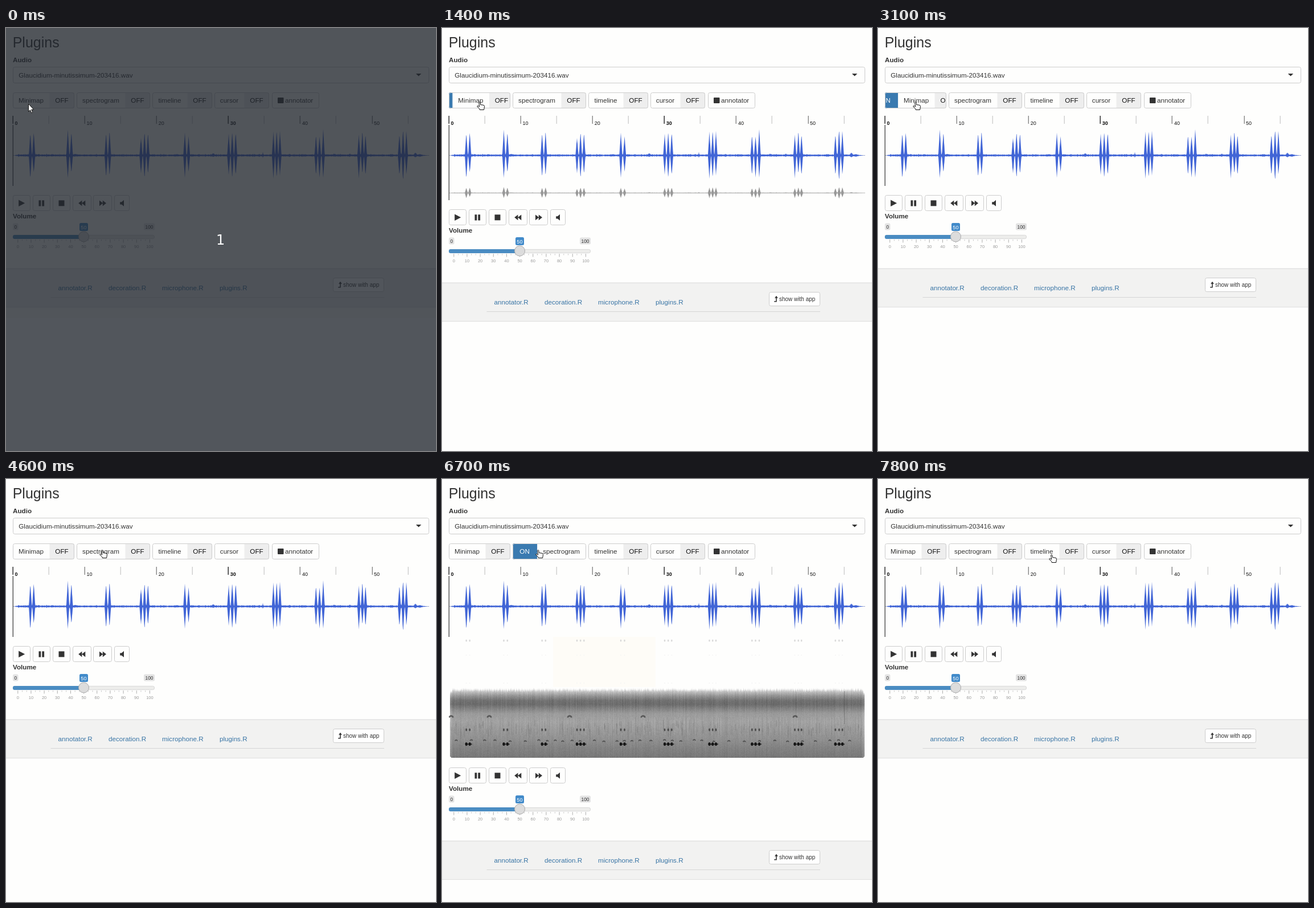
An HTML page with a canvas for the animation above (8 s loop, 755 by 742 pixels).

```html
<!DOCTYPE html>
<html lang="en">
<head>
<meta charset="utf-8">
<title>Plugins</title>
<style>
html, body { margin: 0; width: 100%; height: 100%; overflow: hidden; background: #fefefd; }
svg { position: absolute; left: 0; top: 0; }
canvas { position: absolute; left: 12px; top: 277px; }
text { font-family: "Liberation Sans", Arial, sans-serif; font-size: 11.67px; fill: #333; }
</style>
</head>
<body>
<canvas id="spec" width="731" height="213"></canvas>
<svg id="stage" width="755" height="742" viewBox="0 0 755 742"></svg>
<script>
const NS = 'http://www.w3.org/2000/svg';
const stage = document.getElementById('stage');
const spec = document.getElementById('spec');

function add(parent, tag, attrs, content) {
  const el = document.createElementNS(NS, tag);
  for (const k in attrs) el.setAttribute(k, attrs[k]);
  if (content !== undefined) el.textContent = content;
  parent.appendChild(el);
  return el;
}
const text = (p, x, y, s, style = '', anchor = 'start') =>
  add(p, 'text', { x, y, style, 'text-anchor': anchor }, s);
const rect = (p, x, y, width, height, fill, more) =>
  add(p, 'rect', { x, y, width, height, fill, ...more });
const line = (p, x1, y1, x2, y2, stroke, w = 1) =>
  add(p, 'line', { x1, y1, x2, y2, stroke, 'stroke-width': w });
const path = (p, d, fill, more) => add(p, 'path', { d, fill, ...more });
const box = (p, x, y, w, h, fill = 'none') =>
  rect(p, x + .5, y + .5, w - 1, h - 1, fill, { rx: 3, stroke: '#ccc' });

function seeded(s) {
  return () => {
    s = (s + 0x6d2b79f5) | 0;
    let v = Math.imul(s ^ (s >>> 15), 1 | s);
    v = (v + Math.imul(v ^ (v >>> 7), 61 | v)) ^ v;
    return ((v ^ (v >>> 14)) >>> 0) / 4294967296;
  };
}

// owl calls: x, height above the axis, depth below it
const calls = [
  [42.7, 41, 43], [48.7, 43, 32], [108.5, 47, 41], [114.8, 43, 32],
  [175.7, 41, 40], [181.8, 44, 36], [237, 33, 34], [243.2, 43, 42], [249.3, 40, 33],
  [314, 42, 41], [320.5, 35, 30], [391, 38, 34], [397.2, 44, 42], [403.3, 43, 37],
  [469.5, 42, 41], [475.2, 45, 40], [481, 44, 36], [544.3, 36, 35], [550.5, 35, 41],
  [557, 46, 39], [619.5, 37, 41], [625.7, 43, 32], [631.2, 38, 36],
  [690.7, 38, 36], [697.2, 47, 46], [703, 44, 34]
];
const bumps = [[57, 3], [82, 3], [122, 4], [300, 3], [364, 5], [451, 9], [576, 4], [604, 4], [719, 6]];

function wavePath() {
  const rnd = seeded(11), top = [], bottom = [];
  for (let x = 16; x <= 739; x += .5) {
    const n = 1 + rnd() * .9 + (rnd() > .93 ? 1.2 : 0);
    let up = n, down = n;
    for (const [c, u, d] of calls) {
      const k = Math.max(0, 1 - Math.abs(x - c) / 2.7) * (.9 + rnd() * .1);
      up = Math.max(up, u * k);
      down = Math.max(down, d * k);
      const tail = x - c;
      if (tail > 0 && tail < 9) { up += rnd() * .35; down += rnd() * .35; }
    }
    for (const [c, h] of bumps) {
      const k = Math.max(0, 1 - Math.abs(x - c) / (h > 8 ? 1.2 : 5)) * (.5 + rnd() * .5);
      up = Math.max(up, h * k);
      down = Math.max(down, h * k * .7);
    }
    const fade = Math.min(1, (x - 14) / 8, (740 - x) / 12);
    top.push(`${x} ${(-up * fade).toFixed(2)}`);
    bottom.unshift(`${x} ${(down * fade).toFixed(2)}`);
  }
  return 'M' + top.concat(bottom).join('L') + 'Z';
}

function drawSpectrogram() {
  const g = spec.getContext('2d'), W = 731, H = 213, rnd = seeded(5);
  const tones = [[88, 254], [92, 222], [96, 190], [103, 148], [111, 113], [118, 108], [126, 132],
    [134, 154], [148, 162], [165, 152], [180, 143], [194, 130], [207, 122], [213, 116]];
  const tone = y => {
    let i = 1;
    while (i < tones.length - 1 && tones[i][0] < y) i++;
    const [a, p] = tones[i - 1], [b, q] = tones[i];
    return p + (q - p) * (y - a) / (b - a);
  };
  const img = g.createImageData(W, H);
  for (let x = 2; x < W - 1; x++) {
    const edge = Math.min(x - 2, W - 2 - x);
    const lift = edge < 6 ? (6 - edge) ** 2 / 5 : 0;
    const streak = (rnd() - .5) * 15, soft = (rnd() - .5) * 12, start = 88 + lift + rnd() * 5;
    for (let y = Math.ceil(start); y < H - 1 - lift * .3; y++) {
      const v = tone(y) + streak * (y < 130 ? 1 : .55) + (y > 140 && y < 172 ? soft : 0)
        + (rnd() - .5) * 11 + (edge < 5 ? 25 - edge * 5 : 0);
      const i = (y * W + x) * 4;
      img.data[i] = img.data[i + 1] = img.data[i + 2] = v;
      img.data[i + 3] = 255 * Math.min(1, (y - start + 1) / 5);
    }
  }
  g.putImageData(img, 0, 0);

  const dot = (x, y, rx, ry, color) => {
    g.fillStyle = color;
    g.beginPath();
    g.ellipse(x - 12, y - 277, rx, ry, 0, 0, 7);
    g.fill();
  };
  const arch = (x, y, r, w, color) => {
    g.strokeStyle = color;
    g.lineWidth = w;
    g.beginPath();
    g.arc(x - 12, y - 277, r, Math.PI * 1.05, Math.PI * 1.95);
    g.stroke();
  };
  g.fillStyle = 'rgba(255,250,235,.35)';
  g.fillRect(183, 0, 180, 88);
  for (let i = 0; i < 190; i++) {
    g.fillStyle = `rgba(70,70,70,${.07 + rnd() * .17})`;
    g.fillRect(rnd() * 728, 145 + rnd() * 18, 1, 6 + rnd() * 16);
  }
  for (const x of [16, 83, 224, 353, 620]) arch(x, 419, 3.4, 2.6, 'rgba(70,70,70,.8)');
  for (let x = 25; x < 735; x += 13 + rnd() * 17)
    arch(x, 459 + rnd() * 3, 2, 1.8, 'rgba(55,55,55,.72)');
  for (const [x] of calls) {
    dot(x, 283.5, 1.3, 2, '#d9d9d9');
    dot(x, 309, 1, 1, '#f5f5f5');
    dot(x, 358, 1, 1, '#f5f5f5');
    dot(x, 440, 1.4, 2.4, 'rgba(50,50,50,.75)');
    dot(x + 1, 465, 3.2, 1.5, 'rgba(30,30,30,.7)');
    dot(x, 465, 2.1, 3, '#151515');
  }
  g.fillStyle = 'rgba(50,50,50,.35)';
  g.fillRect(694, 95, 1, 58);
}

const ON_W = 44;
function makeSwitch(x, w, label) {
  const id = 'clip-' + label, y = 113;
  const clip = add(stage, 'clipPath', { id });
  rect(clip, x, y, w, 28, '#000', { rx: 3 });
  const frame = add(stage, 'g', { 'clip-path': `url(#${id})` });
  const strip = add(frame, 'g', {});
  const off = x + w - ON_W;
  rect(strip, x - ON_W, y, ON_W, 28, '#3a7ab0');
  text(strip, x - ON_W / 2, 131.3, 'ON', 'fill:#fff', 'middle');
  rect(strip, off + .5, y, ON_W, 28, '#eee');
  text(strip, x + (w - ON_W) / 2, 131.3, label, '', 'middle');
  text(strip, off + ON_W / 2, 131.3, 'OFF', 'fill:#111', 'middle');
  box(stage, x, y, w, 28);
  return f => strip.setAttribute('transform', `translate(${(f * ON_W).toFixed(1)} 0)`);
}

// header
text(stage, 11.7, 34.3, 'Plugins', 'font-size:25px');
text(stage, 12, 60, 'Audio', 'font-weight:bold');
box(stage, 12, 68, 731, 29);
text(stage, 22.3, 86.5, 'Glaucidium-minutissimum-203416.wav');
path(stage, 'M719.8 80h9.4l-4.7 4.6z', '#333');

const setMinimap = makeSwitch(12, 108, 'Minimap');
const setSpectro = makeSwitch(124, 129, 'spectrogram');
makeSwitch(257, 105, 'timeline');
makeSwitch(366, 96, 'cursor');
box(stage, 467, 113, 83, 28);
rect(stage, 477, 122, 10.5, 10, '#333', { rx: 1 });
text(stage, 490, 131.3, 'annotator');

// time ruler
for (let i = 0; i < 6; i++) {
  const x = 12 + i * 126.1, main = i % 3 === 0;
  line(stage, Math.round(x) + .2, 154, Math.round(x) + .2, 168, main ? '#111' : '#555', main ? 1.3 : 1);
  line(stage, Math.round(x + 63) + .2, 154, Math.round(x + 63) + .2, 168, '#bbb');
  text(stage, x + 3.5, 169.7, i * 10, `font-size:9px;fill:#111;font-weight:${main ? 'bold' : 'normal'}`);
}

// waveform and minimap
const wave = wavePath();
line(stage, 12, 223.5, 743, 223.5, '#8d9cc9', .8);
path(stage, wave, '#4165d6', { transform: 'translate(0 223.5)' });
const minimap = add(stage, 'g', {});
line(minimap, 12, 289.3, 743, 289.3, '#aaa', .8);
path(minimap, wave, '#999', { transform: 'translate(0 289.3) scale(1 .23)' });
line(minimap, 12.3, 277, 12.3, 302, '#333', 1.2);
line(stage, 12.3, 170, 12.3, 277, '#333', 1.2);

// everything under the waveform moves together
const lower = add(stage, 'g', {});
[[12, 31], [47, 31], [82, 31], [117, 33], [153, 33], [190, 27]].forEach(([x, w]) => box(lower, x, 293, w, 28));
path(lower, 'M22.2 301.6l11 5.7-11 5.7z', '#333');
path(lower, 'M57.5 302.2h3.8v10.3h-3.8zM63.3 302.2h3.8v10.3h-3.8z', '#333');
path(lower, 'M92.5 302.3h10v10h-10z', '#333');
path(lower, 'M133.4 302.4v9.8l-6.2-4.9zM139.3 302.4v9.8l-6.2-4.9z', '#333');
path(lower, 'M164 302.4v9.8l6.2-4.9zM169.8 302.4v9.8l6.2-4.9z', '#333');
path(lower, 'M200.2 305.2h2.8l4-3.4v11l-4-3.4h-2.8z', '#333');

text(lower, 12, 334, 'Volume', 'font-weight:bold');
rect(lower, 12, 342.5, 9.5, 12, '#e3e3e3', { rx: 2.5 });
text(lower, 16.7, 351.7, '0', 'font-size:8.33px', 'middle');
rect(lower, 242, 342.5, 19, 12, '#e3e3e3', { rx: 2.5 });
text(lower, 251.5, 351.7, '100', 'font-size:8.33px', 'middle');
rect(lower, 129, 342, 15, 14, '#428bca', { rx: 2.5 });
text(lower, 136.4, 352.5, '50', 'font-size:9.17px;fill:#fff', 'middle');
rect(lower, 12.3, 363.4, 248.4, 6.2, '#ededeb', { rx: 3, stroke: '#ccc', 'stroke-width': .7 });
rect(lower, 12, 363, 124, 7, '#4a8cc2', { rx: 3 });
for (let i = 0; i <= 30; i++) {
  const x = 20.8 + i * 7.72, big = i % 3 === 0;
  line(lower, x, 371, x, big ? 376.5 : 373.5, big ? '#999' : '#bbb', .8);
  if (big) text(lower, x, 386.3, i / 3 * 10, 'font-size:7.5px;fill:#999', 'middle');
}
add(lower, 'circle', { cx: 136.5, cy: 366, r: 9, fill: '#dcdcdc', stroke: '#ababab' });

// file tabs
rect(lower, 0, 422, 755, 68, '#f2f2f1');
line(lower, 0, 422, 755, 422, '#d8d8d8');
line(lower, 0, 489.6, 755, 489.6, '#dedede');
[[91.5, 'annotator.R'], [180, 'decoration.R'], [274, 'microphone.R'], [375, 'plugins.R']]
  .forEach(([x, s]) => text(lower, x, 459.6, s, 'fill:#3874a5'));
line(lower, 78.5, 472.5, 664, 472.5, '#d5d5d5');
box(lower, 574, 438, 90, 25, '#fff');
text(lower, 592, 454, 'show with app', 'font-size:10px');
path(lower, 'M587 447.5v7.3h-3.8', 'none', { stroke: '#333', 'stroke-width': 1.6 });
path(lower, 'M587 444.7l2.9 4h-5.8z', '#333');

// countdown and pointers
const cover = add(stage, 'g', {});
rect(cover, 0, 0, 755, 742, 'rgb(33,38,46)', { 'fill-opacity': .78 });
text(cover, 376.7, 380, '1', 'font-family:"DejaVu Sans",sans-serif;font-size:24px;fill:#fff', 'middle');
const outline = { stroke: '#111', 'stroke-width': 1, 'stroke-linejoin': 'round' };
const arrow = path(stage, 'M39.5 133v13.6l3-2.7 2 4.8 2.2-1-2-4.6h4z', '#fff', outline);
const hand = path(stage, 'M3.6 1.6C3.9 .3 5.5 .3 5.8 1.6L6.5 5.6 11 6.1Q13.6 6.4 13.5 8.5L13 12 12.6 14.5H5.2L4.8 12.6 .9 9Q.5 7.3 2.3 7.6L4.7 9Z', '#fff', outline);

drawSpectrogram();

// CSS "ease" curve
function ease(p) {
  if (p <= 0) return 0;
  if (p >= 1) return 1;
  let lo = 0, hi = 1, s = .5;
  for (let i = 0; i < 20; i++) {
    s = (lo + hi) / 2;
    const r = 1 - s;
    if (3 * r * r * s * .25 + 3 * r * s * s * .25 + s ** 3 < p) lo = s; else hi = s;
  }
  const r = 1 - s;
  return 3 * r * r * s * .1 + 3 * r * s * s + s ** 3;
}
const ramp = (t, start, dur) => ease((t - start) / dur);

const route = [[0, 41, 139], [100, 41, 139], [400, 63, 137.5], [700, 63, 137.5], [900, 67, 136],
  [3800, 67, 136], [4000, 112, 132], [4400, 112, 132], [4500, 140, 121], [4600, 170, 131],
  [7300, 170, 131], [7800, 306, 139], [8000, 306, 139]];
function pointer(t) {
  const i = route.findIndex(k => k[0] > t);
  const [a, x, y] = route[i - 1], [b, u, v] = route[i];
  const f = (t - a) / (b - a);
  return [x + (u - x) * f, y + (v - y) * f];
}

const show = (el, on) => { el.style.visibility = on ? 'visible' : 'hidden'; };

function render(ms) {
  const t = Math.floor(ms % 8000 / 100) * 100;
  const mapOn = t >= 1400 && t < 3100;
  const specOn = t >= 5200 && t < 6800;
  show(cover, t < 100);
  show(arrow, t < 100);
  show(hand, t >= 100);
  show(minimap, mapOn);
  show(spec, specOn);
  setMinimap(t < 1400 ? 0 : ramp(t, 1322, 600) - ramp(t, 2982, 420));
  setSpectro(t < 5200 ? 0 : t < 5500 ? .16 : 1 - ramp(t, 6685, 420));
  lower.setAttribute('transform', `translate(0 ${specOn ? 213 : mapOn ? 25 : 0})`);
  const [x, y] = pointer(t);
  hand.setAttribute('transform', `translate(${x - 6} ${y - 7})`);
}

const begin = performance.now();
function tick() {
  render(performance.now() - begin);
  requestAnimationFrame(tick);
}
tick();
</script>
</body>
</html>
```
